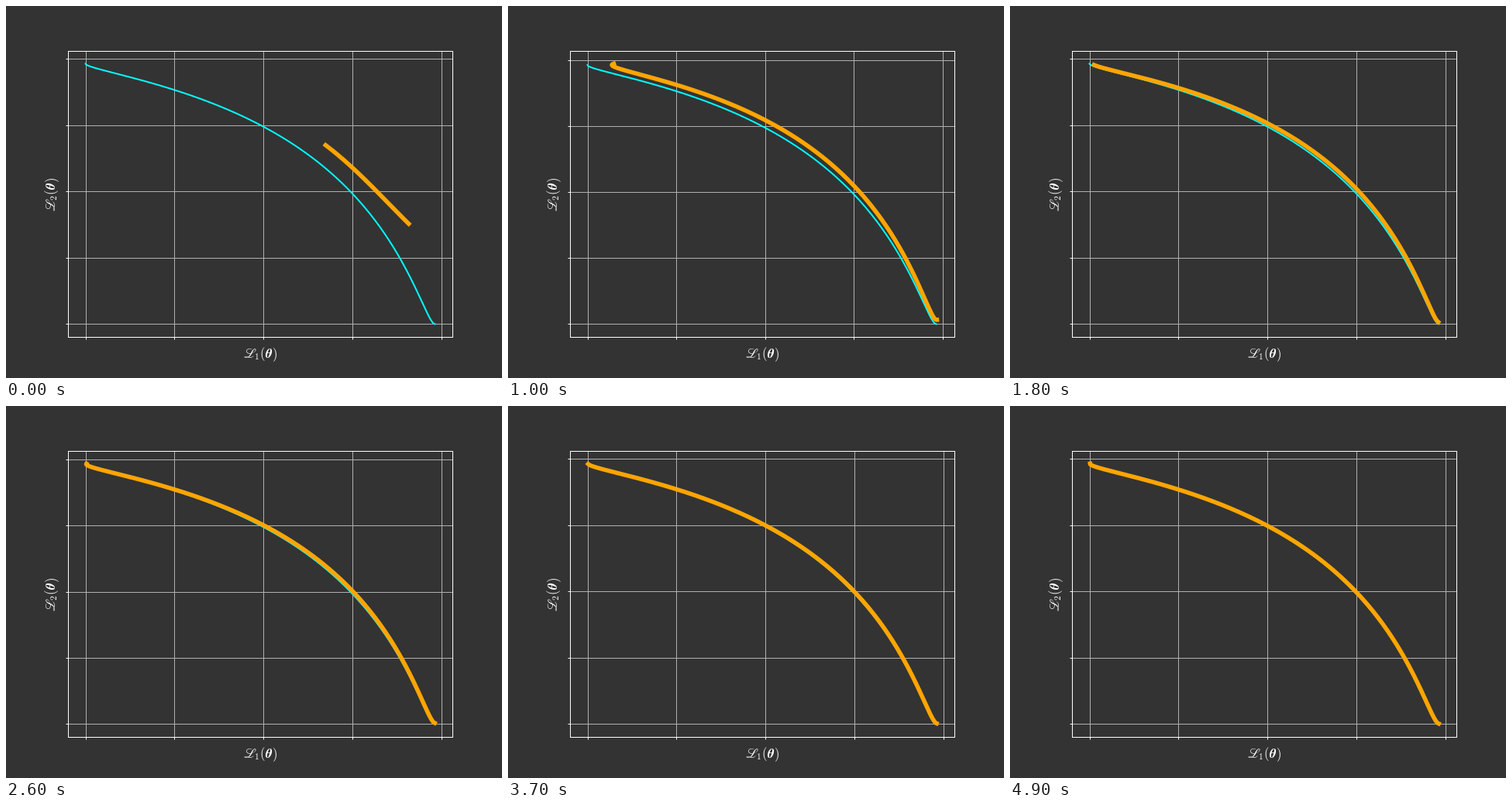
Animation of 640x480 px, one loop 5000 ms. Source, as a matplotlib script:

```python
import numpy as np
import matplotlib.pyplot as plt
from matplotlib.animation import FuncAnimation

W, H, DPI = 640, 480, 100
PX = 72 / DPI  # points per pixel
FRAMES, INTERVAL = 50, 100
BACK, GRID = "#333333", "#b0b0b0"


def losses(along, away=0):
    """Two competing bell-shaped losses with minima at along = 1 and -1."""
    return tuple(1 - np.exp(-(along - c) ** 2 - away ** 2) for c in (1, -1))


def swing(step):
    """Damped overshoot of the curve's ends during training."""
    return 0.18 * np.exp(-step / 17) * np.cos(2 * np.pi * (step - 7) / 21)


def model_curve(step):
    s = np.linspace(0, 1, 200)

    # The ends spread quickly, then swing around the ends of the front.
    grow = min(step / 6, 1)
    first = grow * (1 + swing(step))
    last = -0.478 - grow * (0.512 + 0.3 * swing(step - 3))

    # The distance from the front decays at its own pace at ends and middle.
    start = 0.04 + 0.31 * np.exp(-(step / 15) ** 3)
    middle = 0.075 + 0.29 * np.exp(-step / 13)
    end = 0.02 + 0.43 * np.exp(-np.sqrt(step / 5))
    bulge = middle - (start + end) / 2
    away = start + (end - start) * s + bulge * np.sin(np.pi * s)

    return losses(first + (last - first) * s, away)


def padded(*values):
    top = max(v.max() for v in values)
    return -0.05 * top, 1.05 * top


def label(x, y, index, rotation=0):
    """Loss symbol with its baseline starting at pixel (x, y)."""
    angle = np.radians(rotation)
    pieces = [(0, r"\mathscr{L}", "stix", "left"),
              (28.7, rf"{{}}_{index}(", "cm", "right"),
              (33, r"\boldsymbol{\theta}", "stix", "center"),
              (44, ")", "cm", "right")]
    for offset, text, family, ha in pieces:
        px, py = x + offset * np.cos(angle), y - offset * np.sin(angle)
        fig.text(px / W, 1 - py / H, f"${text}$", color="white", fontsize=12,
                 ha=ha, va="baseline", rotation=rotation,
                 rotation_mode="anchor", math_fontfamily=family)


fig = plt.figure(figsize=(W / DPI, H / DPI), dpi=DPI, facecolor=BACK)
ax = fig.add_axes([0.125, 0.11, 0.775, 0.77], facecolor=BACK)
ticks = np.linspace(0, 1, 5)
ax.set_xticks(ticks, [])
ax.set_yticks(ticks, [])
ax.tick_params(color="white", length=3 * PX, width=PX)
ax.grid(color=GRID, linewidth=PX)
ax.spines[:].set(color="white", linewidth=PX)
label(306, 454, 1)
label(64, 265, 2, rotation=90)

front = losses(np.linspace(1, -1, 200))
ax.plot(*front, color="cyan", linewidth=2 * PX)
model, = ax.plot([], [], color="orange", linewidth=5.5 * PX)


def draw(step):
    curve = model_curve(step)
    model.set_data(*curve)
    ax.set_xlim(padded(front[0], curve[0]))
    ax.set_ylim(padded(front[1], curve[1]))
    return model,


anim = FuncAnimation(fig, draw, frames=FRAMES, interval=INTERVAL,
                     repeat=True, repeat_delay=0, blit=False)
plt.show()
```
